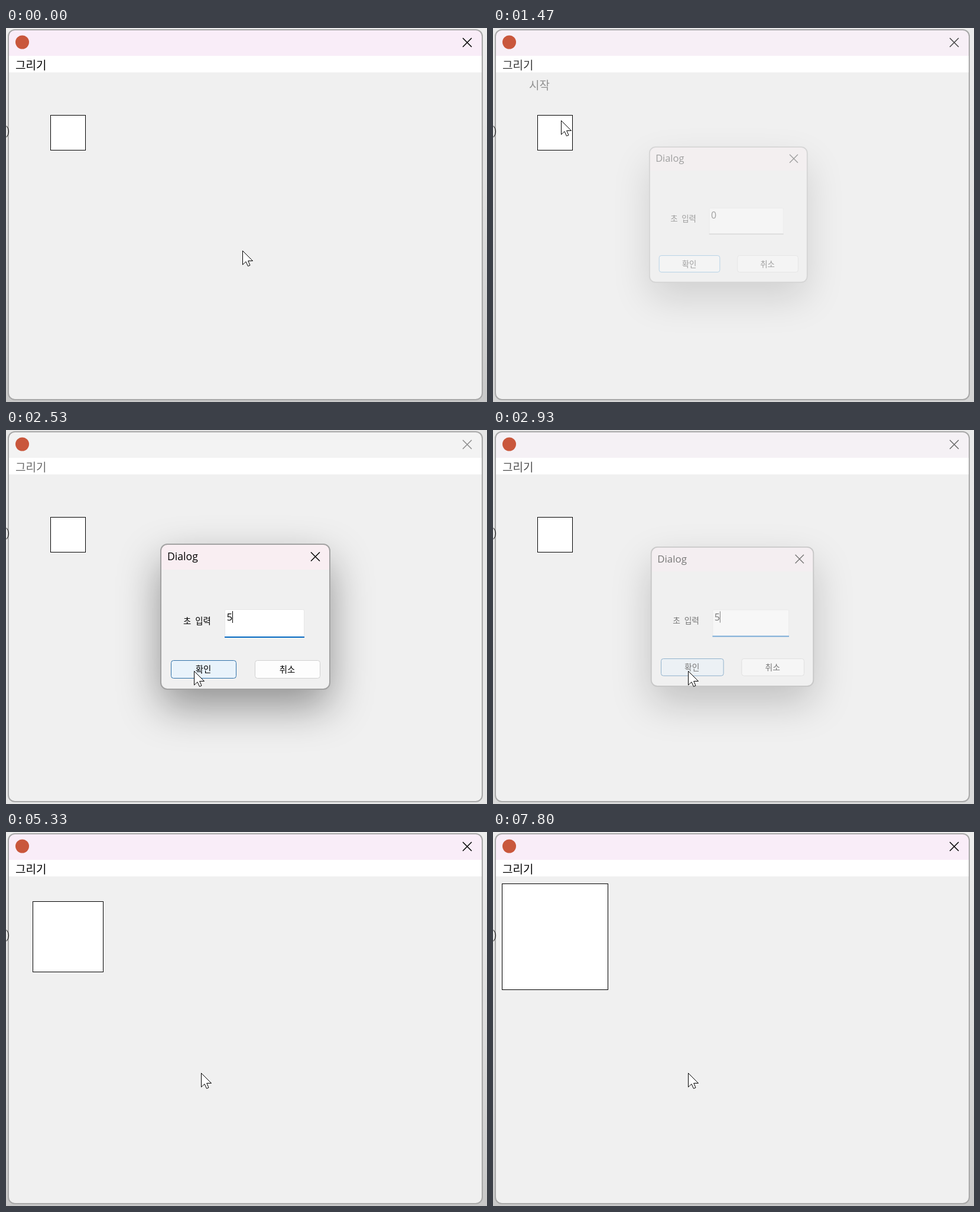
An HTML page that plays this animation: 814x632 px, repeating every 8 s.

```html
<!DOCTYPE html>
<html lang="ko">
<head>
<meta charset="utf-8">
<style>
html, body { margin: 0; width: 100%; height: 100%; overflow: hidden; }
svg { display: block; width: 814px; height: 632px; }
text { font: 19px "Noto Sans CJK KR", "Noto Sans CJK", sans-serif; white-space: pre; }
.latin { font: 17px "Open Sans", sans-serif; }
.title { font-size: 17.6px; }
.small { font-size: 14.4px; }
.mid { text-anchor: middle; }
.x { fill: none; stroke: #000; stroke-width: 1.5; }
#panel { filter: drop-shadow(0 7px 7px rgba(0,0,0,.15)); }
#frame { filter: drop-shadow(0 29px 35px rgba(0,0,0,.4)); }
</style>
</head>
<body>
<svg viewBox="0 0 814 632">
  <defs>
    <linearGradient id="shade" x2="0" y2="1">
      <stop stop-color="#eee"/><stop offset=".5" stop-color="#dedede"/><stop offset="1" stop-color="#c8c8c8"/>
    </linearGradient>
    <clipPath id="winClip"><rect x="4" y="3" width="802" height="625" rx="11"/></clipPath>
    <clipPath id="dlgClip"><rect x="262" y="193" width="286" height="245" rx="11"/></clipPath>
  </defs>

  <rect width="814" height="632" fill="#e6e6e6"/>
  <rect id="outer" width="814" height="632" fill="url(#shade)"/>

  <g clip-path="url(#winClip)">
    <rect width="814" height="632" fill="#f0f0f0"/>
    <rect id="bar" width="814" height="47"/>
    <rect y="47" width="814" height="28" fill="#fff"/>
  </g>
  <rect x="4" y="3" width="802" height="625" rx="11" fill="none" stroke="#a8a8a8" stroke-width="2"/>
  <path d="M1 165.5Q8 175 1 184.5" fill="none" stroke="#000"/>
  <circle cx="27.5" cy="24" r="11.5" fill="#c9573c"/>
  <path id="close" class="x" d="M773 17l15 15m0-15l-15 15"/>
  <rect id="hot" x="5" y="48" width="76" height="27" rx="3" fill="#f9f9f9"/>
  <text id="menuName" x="16" y="69.500">그리기</text>

  <rect id="square" fill="#fff" stroke="#000" shape-rendering="crispEdges"/>

  <g id="menu">
    <g id="panel"><rect x="6.5" y="77.5" width="165" height="74" rx="4" fill="#f9f9f9" stroke="#e6e6e6" stroke-width="1.5"/></g>
    <text x="61" y="139" fill="#1a1a1a">종료</text>
  </g>
  <g id="item">
    <rect id="itemHot" x="12" y="80" width="153" height="33" rx="4" fill="#f1f1f1"/>
    <text x="61" y="104" fill="#1a1a1a">시작</text>
  </g>

  <g id="dialog">
    <rect id="frame" x="262" y="193" width="286" height="245" rx="11" fill="#f0f0f0"/>
    <rect x="261" y="192" width="288" height="44" fill="#f9eef2" clip-path="url(#dlgClip)"/>
    <rect x="262" y="193" width="286" height="245" rx="11" fill="none" stroke="#a2a2a2" stroke-width="2"/>
    <text class="latin title" x="273" y="220">Dialog</text>
    <path class="x" d="M516 206.500l15 15m0-15l-15 15"/>
    <text class="small" x="300" y="328" word-spacing="3">초 입력</text>
    <rect x="370.500" y="303.500" width="134" height="47" rx="2" fill="#fff" stroke="#e6e6e6"/>
    <rect id="line" x="370" width="135"/>
    <rect id="mark" x="374" y="306" width="10" height="20" fill="#0078d7"/>
    <text id="digit" class="latin" x="373.500" y="322"></text>
    <path id="caret" d="M383.500 306v20" stroke="#000"/>
    <rect id="ok" x="279.500" y="389.500" width="110" height="30" rx="4"/>
    <text class="small mid" x="334" y="410">확인</text>
    <rect x="421.500" y="389.500" width="110" height="30" rx="4" fill="#fdfdfd" stroke="#d0d0d0"/>
    <text class="small mid" x="476" y="410">취소</text>
  </g>

  <g id="pointer">
    <path id="arrow" d="M.5.500V24L6 18.800 9.500 26.500 13 25 9.700 17.500H17.500Z" fill="#fff" stroke="#000"/>
    <path id="beam" d="M-3.500-9.500h7M0-9.500v19M-3.500 9.500h7" stroke="#000"/>
  </g>
</svg>
<script>
const $ = id => document.getElementById(id);
const set = (id, attrs) => {
  for (const name in attrs) $(id).setAttribute(name, attrs[name]);
};
const show = (id, on) => set(id, { opacity: +on });

// All times are in ticks of 1/15 s.
const ramp = (k, from, to) => Math.min(1, Math.max(0, (k - from) / (to - from)));
const easeOut = p => 1 - (1 - p) ** 2;
const lerp = (a, b, p) => a + (b - a) * p;
const mix = (a, b, p) => `rgb(${a.map((v, i) => Math.round(lerp(v, b[i], p)))})`;
const black = [0, 0, 0];

const moves = [
  { from: 3, to: 12, x: 33, y: 63 },     // menu
  { from: 15, to: 18, x: 59, y: 95 },    // first item
  { from: 21, to: 24, x: 159, y: 205 },
  { from: 24, to: 28, x: 393, y: 315 },  // input field
  { from: 30, to: 33, x: 201, y: 301 },  // drag selects the digit
  { from: 33, to: 37, x: 318, y: 407 },  // confirm button
  { from: 40, to: 41, x: 330, y: 407 }
];

function pointerAt(k) {
  let x = 400, y = 376;
  for (const m of moves) {
    const p = easeOut(ramp(k, m.from, m.to));
    x = lerp(x, m.x, p);
    y = lerp(y, m.y, p);
  }
  return [Math.round(x), Math.round(y)];
}

function drawWindow(k) {
  const active = 1 - ramp(k, 20, 25) + ramp(k, 42, 47);
  const ink = Math.max(0, active * 1.25 - .25);
  set('outer', { opacity: active });
  set('bar', { fill: mix([243, 243, 243], [249, 237, 248], active) });
  $('close').style.stroke = mix([140, 140, 140], black, ink);
  set('menuName', { fill: mix([105, 105, 105], black, ink) });

  const n = Math.floor((k - 49.8) / 7.45);
  const size = n < 0 ? 60 : 200 - 20 * Math.abs(n - 8);
  set('square', { x: 105.5 - size / 2, y: 177.5 - size / 2, width: size - 1, height: size - 1 });
}

function drawMenu(k) {
  const open = easeOut(ramp(k, 12, 15));
  show('hot', k >= 11 && k < 21);
  show('itemHot', k >= 16);
  set('menu', { opacity: k < 21 ? open : 0 });
  set('item', { opacity: open * (1 - ramp(k, 20, 26)) ** 2 });
}

function drawDialog(k) {
  const closing = ramp(k, 42, 46);
  const rest = (1 - ramp(k, 20, 26)) ** 2;
  set('dialog', {
    opacity: ramp(k, 21, 24) * (1 - closing),
    transform: `translate(${405 - 15 * rest} 315) scale(${1 - .15 * rest - .08 * closing}) translate(-405 -315)`
  });

  const typed = k >= 34, selected = k >= 30 && !typed, hover = k >= 37;
  set('line', k >= 28 ? { y: 349, height: 2, fill: '#0067c0' } : { y: 350, height: 1, fill: '#868686' });
  show('mark', selected);
  show('caret', typed);
  $('digit').textContent = typed ? '5' : '0';
  set('digit', { fill: selected ? '#fff' : '#000' });
  set('ok', {
    fill: k === 40 ? '#cce4f7' : hover ? '#e9f3fb' : '#fdfdfd',
    stroke: hover ? '#2f70a8' : '#3d94d6'
  });
}

function drawPointer(k) {
  const inField = k >= 28 && k < 33;
  set('pointer', { transform: `translate(${pointerAt(k)})` });
  show('arrow', !inField);
  show('beam', inField);
}

function loop() {
  const k = Math.floor((performance.now() % 8000 + 3.4) * .015) % 120;
  drawWindow(k);
  drawMenu(k);
  drawDialog(k);
  drawPointer(k);
  requestAnimationFrame(loop);
}
loop();
</script>
</body>
</html>
```
